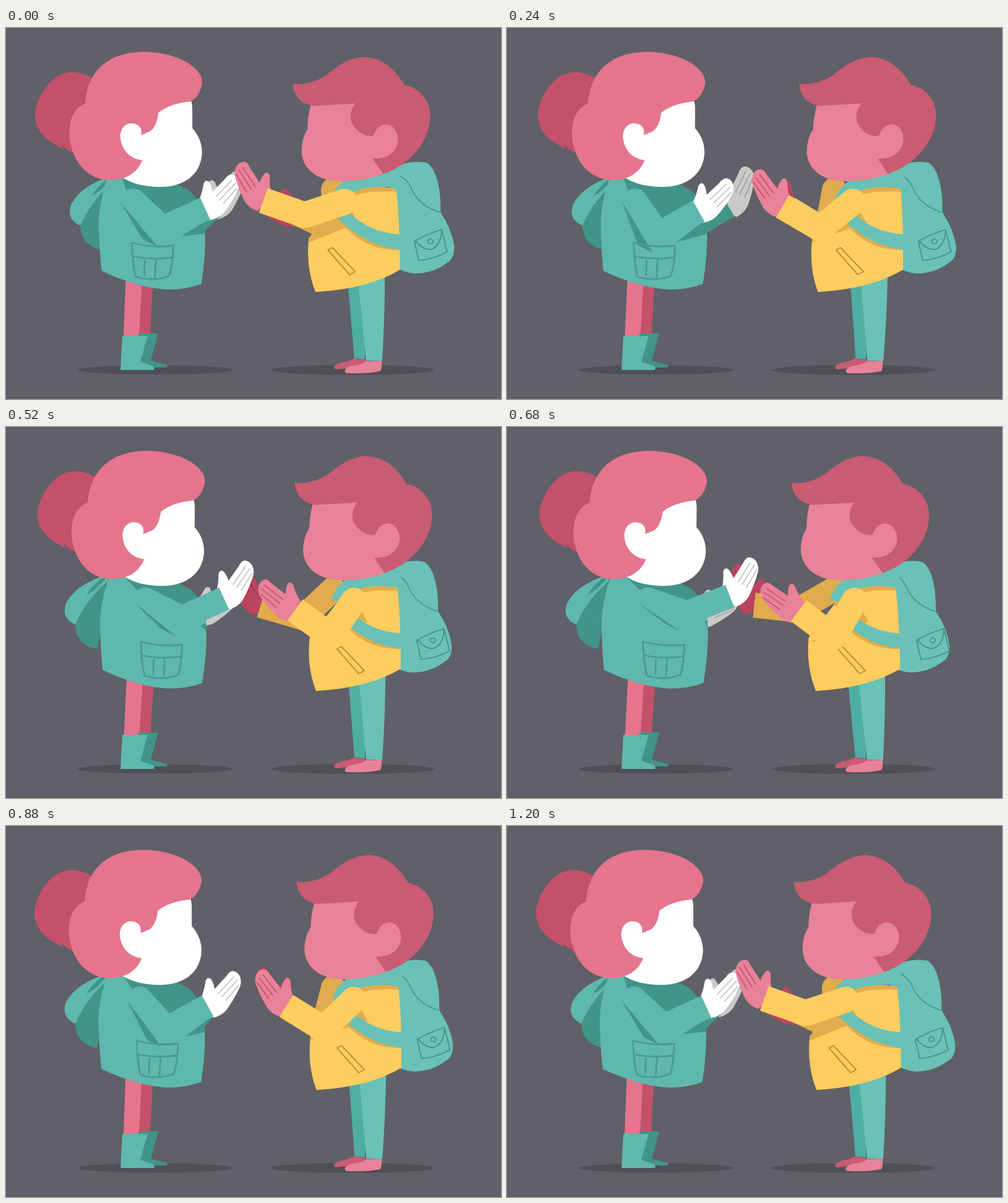
Animation of 800x600 px, one loop 1.24 s. Source, as an HTML page with a canvas:

```html
<!DOCTYPE html>
<html>
<head>
<meta charset="utf-8">
<title>Clapping game</title>
<style>
html, body { margin: 0; height: 100%; overflow: hidden; background: #5f6068; }
canvas { display: block; }
</style>
</head>
<body>
<canvas id="stage" width="800" height="600"></canvas>
<script>
const ctx = document.getElementById('stage').getContext('2d');
const LOOP = 1240, STEP = 40, GROUND = 553;

// Steps that repeat an earlier moment
const holds = { 40: 0, 400: 360, 640: 600, 1200: 0 };

// Each hand moves between three points: x, y, angle in degrees
const hands = {
  girlFront: { pull: [303, 298, -37], rest: [326, 291, -43], reach: [365, 271, -55] },
  girlBack: { pull: [303, 305, -13], rest: [327, 292, -45], reach: [372, 289, -66] },
  boyFront: { pull: [474, 298, -27], rest: [453, 291, -48], reach: [410, 277, -54] },
  boyBack: { pull: [473, 301, -10], rest: [452, 290, -49], reach: [392, 288, -65] }
};

const shapes = {
  hoodLight: 'M175 238Q122 254 106 285Q97 310 122 320L160 330Z',
  hoodDark: 'M184 240Q140 275 121 319Q121 352 156 359L170 300Z',
  hoodFold: 'M171 240Q150 252 139 272Q157 262 170 245Z',
  coat: 'M166 238Q147 290 151 335Q152 368 155 393Q215 421 262 423Q292 423 316 414Q324 365 322 325Q321 285 295 262L250 240Z',
  coatPocket: 'M204 347Q236 356 271 352Q270 385 264 401Q237 411 210 402Q205 378 204 347M205 369Q236 376 270 371M225 375L224 401M243 374L241 404',
  girlLegBack: 'M214 405L238 410L233 500H212Z',
  girlLeg: 'M194 402L220 408L215 502H190Z',
  bootBack: 'M214 494H246L234 538L260 545Q263 549 256 549H238L210 540Z',
  boot: 'M188 498H229L217 540L238 547Q241 551 239 553H185Z',
  bun: 'M142 82Q110 62 82 79Q54 101 48 135Q45 165 74 185L93 196L90 188Q98 198 112 203L140 150Z',
  girlFace: 'M230 140L250 112H296Q302 118 302 130V162Q318 180 317.5 203C315 240 285 257 250 257C225 257 205 252 187 241L222 190Z',
  girlHair: 'M247 137C246 150 240 170 224 170L221 214Q208 245 170 246C125 246 104 205 103 170C104 140 115 128 129 122C133 62 175 38.5 225 38.5C285 40 321 68 318 90Q314 112 298 119Q266 122 247 137Z',
  girlEar: 'M219 173Q222 155 203 154C190 155 184 167 186 180C189 200 203 212 222 214L236 190L224 171Z',
  pack: 'M618 232C640 215 666 215 680 218C698 230 703 268 702 298Q720 325 724 352Q725 374 712 380Q690 397 660 397Q640 395 628 386L624 300Z',
  packLine: 'M629 236Q648 242 656 262Q668 288 701 298',
  packFlap: 'M659 345Q680 333 703 326L712 362Q690 374 666 376ZM661 344Q671 359 686 358Q702 352 703 328M681 345A4 4 0 1 0 689 345A4 4 0 1 0 681 345',
  jacket: 'M500 427Q484 387 489 340L550 262Q590 252 630 260Q636 310 636.5 391Q585 422 500 427Z',
  jacketPocket: 'M520 359L527 355L564 394L555 399Z',
  strapTop: 'M636 246C585 243 543 247 535 282',
  strapLow: 'M556 300Q590 332 640 334V359Q585 355 536 308Z',
  strapShade: 'M536 308Q575 362 640 359L600 330Z',
  boyLegBack: 'M551 400H580V536L563 534Z',
  boyLeg: 'M568 400H612Q612 470 608 538H582Z',
  footBack: 'M563 534L584 538L575 548L533 552Q524 547 542 541Q555 539 563 534Z',
  foot: 'M582 539L607 538Q608 550 605 555Q580 560 550 558Q543 553 556 547Q575 545 582 539Z',
  boyFace: 'M494 118L570 112L605 175L592 210L610 236Q580 247 545 248C508 249 479 232 477 200Q477 178 486.500 164Q487 138 494 118Z',
  boyHair: 'M462.5 90Q488 94 516 77Q550 47 578 47C610 48 630 70 643 92C670 97 686 120 685 145C683 185 652 222 609 236L592 211L596 174Q577 178 563 161C553 150 555 133 564 122L497 126Q466 122 462.5 90Z',
  boyEar: 'M595 170Q601 156 614 156C626 157 633 168 633 181C632 198 618 213 592 211L585 190Z',
  hand: 'M-8 -17H0Q14 -23 26 -33Q34 -37 35 -29Q33 -20 28 -13L58 -15Q70 -18 73 -11Q76 -5 73 2Q68 12 58 15Q40 22 18 26Q4 27 -8 19Z',
  fingers: 'M66 -6L27 -3M67 2L27 5M63 10L28 14'
};
for (const k in shapes) shapes[k] = new Path2D(shapes[k]);

const teal = '#5fb8ad', tealDark = '#419488', pack = '#69c1b7', line = '#418f88';
const pink = '#e5758d', pinkDark = '#c45169', skin = '#e88299', hair = '#c95b73';
const yellow = '#fecd5f', yellowDark = '#e1ac4d';

// Raised cosine around a moment of the loop
function bump(t, centre, width) {
  const d = Math.abs((t - centre + 1.5 * LOOP) % LOOP - LOOP / 2);
  return d < width ? (1 + Math.cos(Math.PI * d / width)) / 2 : 0;
}

// How far bodies and hands have moved at time t
function poseAt(t) {
  const girlBack = bump(t, 160, 220), boyFront = bump(t, 60, 250);
  const swap = bump(t, 620, 260), settle = bump(t, 680, 330), windUp = bump(t, 1160, 240);
  return {
    girl: {
      swing: swap - girlBack,
      lean: -2 + 6 * girlBack + 8 * swap - 4 * bump(t, 1080, 160),
      twist: 7 + 10 * swap - 9 * girlBack - 8 * windUp,
      hood: -9 + 14 * girlBack + 8 * windUp
    },
    boy: {
      swing: boyFront - swap,
      lean: 12 - 13 * boyFront - 15 * settle,
      twist: 15 - 17 * boyFront,
      pack: 2 - 2 * boyFront - 11 * settle,
      flap: 7 - 7 * boyFront - 4 * settle
    }
  };
}

function handAt({ pull, rest, reach }, swing) {
  const goal = swing > 0 ? reach : pull;
  return rest.map((v, i) => v + (goal[i] - v) * Math.abs(swing));
}

// Two-bone arm whose elbow hangs below the line from shoulder to wrist
function bend(sx, sy, [wx, wy, angle], upper, fore) {
  const dx = wx - sx, dy = wy - sy, d = Math.hypot(dx, dy);
  const along = (upper ** 2 - fore ** 2 + d * d) / (2 * d);
  const drop = Math.sqrt(Math.max(0, upper ** 2 - along ** 2)) * Math.sign(dx);
  const ex = sx + (dx * along - dy * drop) / d;
  const ey = sy + (dy * along + dx * drop) / d;
  return { sx, sy, ex, ey, wx, wy, angle };
}

function fill(color, ...names) {
  ctx.fillStyle = color;
  for (const n of names) ctx.fill(shapes[n]);
}

function stroke(color, width, name) {
  ctx.strokeStyle = color;
  ctx.lineWidth = width;
  ctx.stroke(shapes[name]);
}

function poly(color, ...p) {
  ctx.fillStyle = color;
  ctx.beginPath();
  for (let i = 0; i < p.length; i += 2) ctx.lineTo(p[i], p[i + 1]);
  ctx.fill();
}

function ellipse(color, x, y, rx, ry) {
  ctx.fillStyle = color;
  ctx.beginPath();
  ctx.ellipse(x, y, rx, ry, 0, 0, 7);
  ctx.fill();
}

function scoped(draw) {
  ctx.save();
  draw();
  ctx.restore();
}

const shifted = (dx, dy, draw) => scoped(() => { ctx.translate(dx, dy); draw(); });

// Sway: shear about the ground, given the shift at head height
function leaning(d, draw) {
  const k = d / 463;
  scoped(() => { ctx.transform(1, 0, -k, 1, k * GROUND, 0); draw(); });
}

function drawArm({ sx, sy, ex, ey, wx, wy, angle }, width, sleeve, palm, crease) {
  scoped(() => {
    ctx.translate(wx, wy);
    ctx.scale(Math.sign(wx - sx) * 0.96, 0.96);
    ctx.rotate(angle * Math.PI / 180);
    fill(palm, 'hand');
    stroke(crease, 1.6, 'fingers');
  });
  ctx.strokeStyle = sleeve;
  ctx.lineWidth = width;
  ctx.beginPath();
  ctx.moveTo(sx, sy);
  ctx.lineTo(ex, ey);
  ctx.lineTo(wx, wy);
  ctx.stroke();
  ellipse(sleeve, sx, sy, width / 2, width / 2);
}

function girlBody({ lean, hood }, { sx, sy, ex, ey, wx, wy }) {
  leaning(lean, () => {
    fill(pinkDark, 'girlLegBack');
    fill(pink, 'girlLeg');
  });
  fill(tealDark, 'bootBack');
  fill(teal, 'boot');
  shifted(hood, 0, () => {
    fill(teal, 'hoodLight');
    fill(tealDark, 'hoodDark', 'hoodFold');
  });
  leaning(lean, () => {
    fill(teal, 'coat');
    ctx.clip(shapes.coat);
    ctx.setTransform(1, 0, 0, 1, 0, 0);
    poly(tealDark, 187, 238, sx - 10, sy - 12, ex, ey, 326, 300, 326, 240);
    poly(tealDark, ex + 30, ey + 13, wx + 9, wy + 15, 326, 300, 326, 332);
  });
}

function girlHead() {
  fill(pinkDark, 'bun');
  fill('#fff', 'girlFace');
  fill(pink, 'girlHair');
  fill('#fff', 'girlEar');
}

function boyBody(pose, { sx, sy, ex, ey }) {
  leaning(pose.lean, () => {
    fill('#4eaea4', 'boyLegBack');
    fill(pack, 'boyLeg');
  });
  fill(hair, 'footBack');
  fill(skin, 'foot');
  shifted(pose.pack, 0, () => {
    fill(pack, 'pack');
    stroke(line, 1.5, 'packLine');
  });
  shifted(pose.flap, 0, () => stroke(line, 1.7, 'packFlap'));
  leaning(pose.lean, () => {
    fill(yellow, 'jacket');
    scoped(() => {
      ctx.clip(shapes.jacket);
      shifted(0, 8, () => stroke(yellowDark, 22, 'strapTop'));
      fill(yellowDark, 'strapShade');
      ctx.setTransform(1, 0, 0, 1, 0, 0);
      poly(yellowDark, 484, 349, ex, ey, sx + 12, sy + 16, sx + 22, sy + 34);
    });
    stroke(pack, 23, 'strapTop');
    fill(pack, 'strapLow');
  });
  shifted(pose.twist, 0, () => stroke('#c08f3c', 2, 'jacketPocket'));
}

function boyHead() {
  fill(skin, 'boyFace');
  fill(hair, 'boyHair');
  fill(skin, 'boyEar');
}

function frame() {
  const step = Math.floor(performance.now() % LOOP / STEP) * STEP;
  const { girl, boy } = poseAt(holds[step] ?? step);
  const girlFront = bend(206 + 1.4 * girl.twist, 279, handAt(hands.girlFront, girl.swing), 66, 75);
  const girlBack = bend(240, 290, handAt(hands.girlBack, -girl.swing), 66, 75);
  const boyFront = bend(547 + boy.twist, 281, handAt(hands.boyFront, boy.swing), 68, 71);
  const boyBack = bend(529, 262, handAt(hands.boyBack, -boy.swing), 68, 71);

  ctx.lineJoin = 'round';
  ctx.fillStyle = '#5f6068';
  ctx.fillRect(0, 0, 800, 600);
  ellipse('#4e5056', 241, GROUND, 125, 7.5);
  ellipse('#4e5056', 560, GROUND, 132, 8);

  drawArm(girlBack, 35, tealDark, '#c9c9ca', '#9c9c9e');
  drawArm(boyBack, 40, yellowDark, '#b9455e', '#8f3047');
  girlBody(girl, girlFront);
  boyBody(boy, boyFront);
  leaning(girl.lean, girlHead);
  leaning(boy.lean, boyHead);

  drawArm(girlFront, 39, teal, '#fff', '#bdbdbf');
  const { sx, sy, ex, ey } = girlFront;
  poly(tealDark, sx - 21, sy + 2, ex - 33, ey + 18, ex - 9, ey + 30);
  shifted(girl.twist, 0, () => stroke('#479c91', 2.8, 'coatPocket'));
  drawArm(boyFront, 42, yellow, skin, '#bf5069');
  requestAnimationFrame(frame);
}
frame();
</script>
</body>
</html>
```
